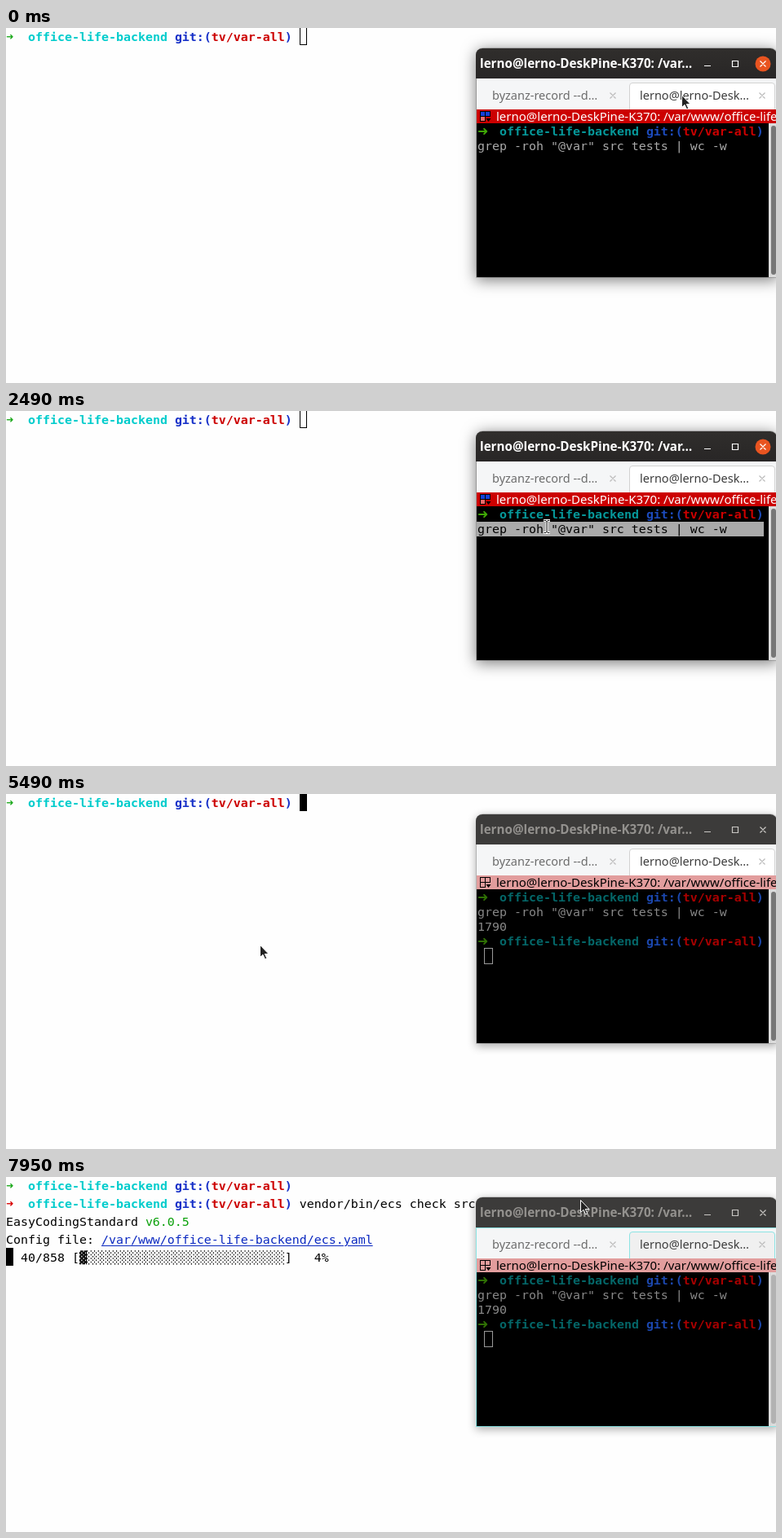
These frames come from a looping animation (944x436 px, 7.99 s). An HTML page:

```html
<!DOCTYPE html>
<html lang="en">
<head>
<meta charset="utf-8">
<title>Two terminals</title>
<style>
html, body { margin: 0; width: 100%; height: 100%; overflow: hidden; background: #fff; }
#stage { position: relative; width: 944px; height: 436px; overflow: hidden; background: #fefefe; }
#stage div, #stage svg { position: absolute; box-sizing: border-box; }
#stage .row { position: static; white-space: pre; }
.mono { font: 14.95px "DejaVu Sans Mono", monospace; }
.ui { font-family: "Noto Sans", "Open Sans", sans-serif; white-space: nowrap; }
.arrow { display: inline-block; width: 9px; line-height: 0; }
b { font-weight: 700; }

#ide { left: 0; top: 0; color: #000; }
#ide .row { height: 22px; line-height: 22px; }
#ide .arrow { color: #1aa81a; }
#ide .failed { color: #d80000; }
#ide .dir { color: #00cccc; }
#ide .git { color: #1630c8; }
#ide .ref { color: #cc0000; }
#ide u { color: #0a28c0; text-underline-offset: 2px; }
#ide i { color: #0aa00a; font-style: normal; }
#caret { width: 9px; height: 22px; border: 1px solid #000; }

#win {
  --title: #fff; --bar: #cc0000; --barText: #fff; --fg: #aaa; --dir: #06989a;
  --git: #1c4bbd; --ref: #cc0000; --green: #3fa806; --tab: #fff; --edge: #d2d2d2; --thumb: #777;
  left: 577px; top: 25px; width: 368px; height: 281px; border-radius: 8px 8px 0 0;
  box-shadow: 0 3px 18px 1px rgba(0,0,0,.5), 0 0 0 1px rgba(0,0,0,.18);
}
#win.off {
  --title: #93918e; --bar: #e29d9d; --barText: #000; --fg: #888; --dir: #046668;
  --git: #1b47ae; --ref: #a80000; --green: #2f7004;
  box-shadow: 0 3px 11px 1px rgba(0,0,0,.32), 0 0 0 1px rgba(0,0,0,.15);
}
#win.idle { --tab: #f0f0f0; --edge: #8ce4e4; --thumb: #b2b2b2; }
#title { left: -1px; top: 0; width: 369px; height: 37px; border-radius: 8px 8px 0 0;
  background: linear-gradient(#302e2c, #282626); color: var(--title); font-weight: 700; font-size: 15.2px; line-height: 37px; padding-left: 5px; }
.off #title { background: #3c3b3a; }
#tabs { left: 0; top: 37px; width: 368px; height: 38px; background: #f5f6f7; color: #6b6b6b; font-size: 14.5px; }
#tabs .label { top: 0; line-height: 40px; }
#active { left: 187px; top: 5px; width: 179px; height: 34px; background: var(--tab); border: 1px solid var(--edge); border-radius: 4px 4px 0 0; }
#bar { left: 0; top: 75px; width: 368px; height: 17px; background: var(--bar); color: var(--barText); font-size: 15px; line-height: 17px; padding-left: 24px; overflow: hidden; }
#term { left: 0; top: 92px; width: 358px; height: 189px; background: #000; color: var(--fg); overflow: hidden; }
#text { left: 1px; top: 1px; }
#term .row, #sel { height: 18px; line-height: 18px; }
#term .arrow { font: 700 16px/0 "DejaVu Sans", sans-serif; color: var(--green); }
#term .dir { color: var(--dir); }
#term .git { color: var(--git); }
#term .ref { color: var(--ref); }
#sel { left: 0; top: 19px; width: 352px; padding-left: 1px; background: #aaa; color: #000; white-space: pre; }
#block { width: 9px; height: 18px; background: #aaa; }
.off #block { width: 11px; height: 20px; margin: -1px; background: none; border: 1px solid #999; }
#scroll { left: 358px; top: 92px; width: 10px; height: 189px; background: #dcdcdc; }
#thumb { left: 3px; top: 3px; width: 6px; height: 183px; border-radius: 3px; background: var(--thumb); }
#frame { display: none; left: -1px; top: 37px; width: 369px; height: 245px; border: solid var(--edge); border-width: 1px 0 1px 1px; }
.idle #frame { display: block; }
#orange { fill: #e95420; }
.off #orange { fill: none; }
#buttons { stroke: #fff; }
.off #buttons { stroke: #c8c6c3; }
#cells { stroke: #000; }
#cells .tint { fill: #1440d8; }
#cells .warm { fill: #f06a6a; }
.off #cells rect { fill: none; }
</style>
</head>
<body>
<div id="stage">
  <div id="ide" class="mono"></div>
  <div id="caret"></div>
  <div id="win">
    <div id="title" class="ui">lerno@lerno-DeskPine-K370: /var…</div>
    <div id="tabs" class="ui">
      <div class="label" style="left:19px">byzanz-record --d…</div>
      <div id="active"></div>
      <div class="label" style="left:200px;color:#3c3c3c">lerno@lerno-Desk…</div>
    </div>
    <div id="bar" class="ui">lerno@lerno-DeskPine-K370: /var/www/office-life-backend</div>
    <div id="term" class="mono">
      <div id="text"></div>
      <div id="sel"></div>
      <div id="block"></div>
    </div>
    <div id="scroll"><div id="thumb"></div></div>
    <div id="frame"></div>
    <svg width="368" height="100" fill="none" style="left:0;top:0">
      <circle id="orange" cx="351" cy="19" r="9.5"/>
      <path id="buttons" stroke-width="1.2" d="M279 21.5h8M313.5 15.5h7v7h-7zM347.5 15.5l7 7m0-7l-7 7"/>
      <path stroke="#bcbcbc" stroke-width="1.3" d="M163.5 54.5l7 7m0-7l-7 7M346.5 54.5l7 7m0-7l-7 7"/>
      <g id="cells">
        <rect class="tint" x="4.5" y="77.5" width="6" height="6"/>
        <rect class="tint" x="10.5" y="77.5" width="6" height="6"/>
        <rect class="warm" x="4.5" y="83.5" width="6" height="6"/>
        <path fill="#000" stroke="none" d="M11.5 86h6l-3 4z"/>
      </g>
    </svg>
  </div>
  <svg id="pointer" width="20" height="24" fill="none" style="left:0;top:0;overflow:visible">
    <path id="hand" fill="#222" stroke="#fff" d="M.5.5v15l3.5-3.2 2.5 5.5 2.3-1-2.5-5.3h4.7z"/>
    <g id="beam">
      <path stroke="#fff" stroke-width="3" d="M-4-7.5h3l1 1 1-1h3M-4 7.5h3l1-1 1 1h3M0-7v14"/>
      <path stroke="#111" d="M-3.5-7.5h2.5l1 1 1-1h2.5M-3.5 7.5h2.5l1-1 1 1h2.5M0-7v14"/>
    </g>
  </svg>
</div>
<script>
const LOOP = 7990, CELL = 9;
const $ = id => document.getElementById(id);
const command = 'grep -roh "@var" src tests | wc -w';

const prompt = (state = '') =>
  `<b><span class="arrow ${state}">➜</span>  <span class="dir">office-life-backend</span> ` +
  `<span class="git">git:(</span><span class="ref">tv/var-all</span><span class="git">)</span></b> `;

// Each row: [time it appears, content]
const ideRows = [
  [0, prompt()],
  [5830, prompt('failed') + '<span id="typed">vendor/bin/ecs check src tests</span>'],
  [7240, 'EasyCodingStandard <i>v6.0.5</i>'],
  [7450, 'Config file: <u>/var/www/office-life-backend/ecs.yaml</u>'],
  [7450, '<span id="progress"></span>']
];
const termRows = [
  [0, prompt()],
  [0, command],
  [4080, '1790'],
  [4200, prompt()]
];

function fill(box, rows) {
  box.innerHTML = rows.map(r => `<div class="row">${r[1]}</div>`).join('');
  const divs = [...box.children];
  return t => divs.forEach((d, i) => { d.style.visibility = t >= rows[i][0] ? 'visible' : 'hidden'; });
}
const showIde = fill($('ide'), ideRows);
const showTerm = fill($('text'), termRows);
$('sel').textContent = command;

// Pointer path: [time, x, y]
const path = [
  [0, 828, 82], [880, 828, 82], [1080, 843, 134], [1400, 889, 151], [1580, 889, 151],
  [2000, 582, 152], [2290, 582, 152], [2490, 663, 142], [2700, 716, 140], [3030, 691, 145],
  [3180, 691, 145], [3490, 691, 193], [5060, 683, 195], [5280, 311, 185],
  [7159, 311, 185], [7160, 313, 186.5], [7200, 313, 186.5], [7280, 704, 28], [LOOP, 704, 28]
];
// Caret of the left terminal: [time, column, row]
const carets = [[0, 40, 0], [5830, 40, 1], [6240, 70, 1], [6770, 0, 2], [7240, 0, 3], [7450, 0, 4]];
// Times at which the block cursor is lit
const lit = [[590, 1190], [1790, 2390], [2990, 4640], [5240, LOOP]];

const within = (t, a, b) => t >= a && t < b;
const latest = (table, t) => table.filter(s => s[0] <= t).pop();

function along(t) {
  const i = Math.max(1, path.findIndex(p => p[0] > t));
  const [t0, x0, y0] = path[i - 1], [t1, x1, y1] = path[i];
  const k = (t - t0) / (t1 - t0);
  return [x0 + (x1 - x0) * k, y0 + (y1 - y0) * k];
}

function progressText(t) {
  const done = Math.min(40, Math.floor((t - 7450) / 50) * 4);
  const full = Math.floor(done / 858 * 28);
  const percent = Math.floor(done / 858 * 100);
  return ` ${String(done).padStart(3)}/858 [${'▓'.repeat(full)}${'░'.repeat(28 - full)}] ${String(percent).padStart(3)}%`;
}

function place(el, x, y) { el.style.left = x + 'px'; el.style.top = y + 'px'; }
function show(el, on) { el.style.display = on ? '' : 'none'; }

function render(t) {
  showIde(t);
  showTerm(t);
  show($('typed'), t >= 6240);
  $('progress').textContent = t >= 7450 ? progressText(t) : '';

  const [, col, row] = latest(carets, t);
  place($('caret'), col * CELL, row * 22 - 1);
  $('caret').style.background = t >= 5490 ? '#000' : 'none';

  $('win').classList.toggle('off', t >= 5490);
  $('win').classList.toggle('idle', t >= 5540);

  const [x, y] = along(t);
  const picked = within(t, 1580, 2950);
  const from = t < 2000 ? Math.max(0, Math.round((x - 578) / CELL)) : 0;
  show($('sel'), picked);
  $('sel').style.clipPath = `inset(0 0 0 ${from ? from * CELL + 1 : 0}px)`;

  const [bx, by] = t < 4030 ? [34, 1] : t < 4200 ? [0, 2] : [1, 4];
  place($('block'), 1 + bx * CELL, 1 + by * 18);
  show($('block'), !(picked && t >= 2000) && lit.some(([a, b]) => within(t, a, b)));

  const inTerm = x > 577 && y > 117;
  show($('pointer'), !within(t, 4030, 5060));
  show($('beam'), inTerm);
  show($('hand'), !inTerm);
  place($('pointer'), x, y);
}

function tick() {
  render(performance.now() % LOOP);
  requestAnimationFrame(tick);
}
tick();
</script>
</body>
</html>
```
